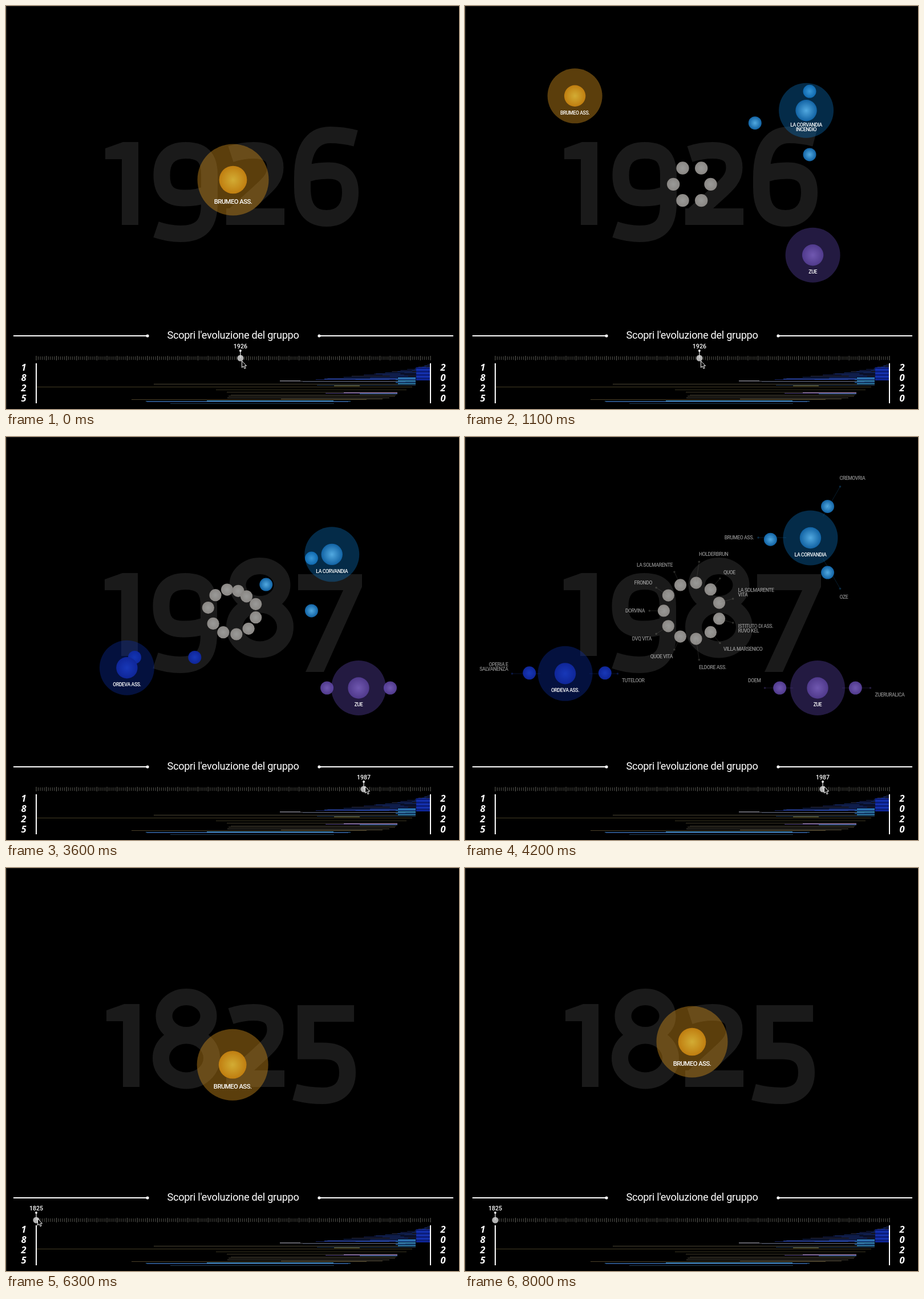
Write an HTML page that moves like this. It is 794 by 705 pixels and loops after 8100 ms.

```html
<!DOCTYPE html>
<html lang="it">
<head>
<meta charset="utf-8">
<title>Evoluzione del gruppo</title>
<style>
html, body { margin: 0; width: 100%; height: 100%; overflow: hidden; background: #000; }
svg { display: block; width: 794px; height: 705px; }
text { font-family: Roboto, "Liberation Sans", sans-serif; fill: #fff; }
.title { font-size: 18.2px; font-weight: 400; letter-spacing: -.3px; text-anchor: middle; }
.year { font-size: 10.6px; font-weight: 500; text-anchor: middle; }
.end { font: italic 700 16.5px "Open Sans", Lato, sans-serif; text-anchor: middle; }
.label { font-weight: 500; letter-spacing: -.05em; }
.big path { fill: none; stroke: #1a1a1a; stroke-width: 29; }
.big .solid { fill: #1a1a1a; stroke: none; }
</style>
</head>
<body>
<svg id="stage" viewBox="0 0 794 705"></svg>
<script>
const NS = 'http://www.w3.org/2000/svg';
const stage = document.getElementById('stage');

function add(parent, tag, attrs = {}, text) {
  const el = document.createElementNS(NS, tag);
  for (const k in attrs) el.setAttribute(k, attrs[k]);
  if (text !== undefined) el.textContent = text;
  parent.append(el);
  return el;
}
const rect = (p, x, y, width, height, fill) => add(p, 'rect', { x, y, width, height, fill });
const clamp = v => Math.max(0, Math.min(1, v));
const mix = (a, b, k) => a + (b - a) * k;
const mixPoint = (a, b, k) => [mix(a[0], b[0], k), mix(a[1], b[1], k)];
const place = (el, [x, y]) => el.setAttribute('transform', `translate(${x.toFixed(2)} ${y.toFixed(2)})`);
const show = (el, on) => { el.style.display = on ? '' : 'none'; };

// Colours: centre, edge, halo, link
const COLORS = {
  gold: ['#d2ac34', '#c07e10', '#c98a1c', '#a87818'],
  sky: ['#52a9e0', '#1263a4', '#0c74c4', '#1a6fae'],
  violet: ['#7058b0', '#503a8c', '#6048b0', '#604aa0'],
  navy: ['#1838b8', '#0f2698', '#0c30a8', '#1c3cb0'],
  grey: ['#9a9a98', '#8a8784', '#888', '#77776f']
};
const defs = add(stage, 'defs');
for (const name in COLORS) {
  const g = add(defs, 'radialGradient', { id: name });
  add(g, 'stop', { offset: 0, 'stop-color': COLORS[name][0] });
  add(g, 'stop', { offset: 1, 'stop-color': COLORS[name][1] });
}

// Backdrop numerals, drawn at their place in the row
const ONE = ['M174 249L205 238H232V383H203V268H174Z', 1];
const TWO = ['M394 259Q414 252.5 434 252.5C464 252.5 472 266 472 283C472 301 461 311 441 329L399 367M386 368.5H488'];
const FIVE = ['M610 254.5H525.5V320H556C588 320 598.5 335 598.5 358C598.5 384 583 398.5 555 398.5Q530 398.5 506 392'];
const SIX = ['M613 231.5Q590 225.5 568 225.5C534 225.5 519.5 255 519.5 300V318C519.5 353 533 371.5 562 371.5C590 371.5 603.5 353 603.5 326C603.5 301 592 288 565 288C546 288 531 291 519.5 297'];
const SEVEN = ['M512 240H624V262L557 411H525L591 268H512Z', 1];
const EIGHT = ['M277 259a39 33.5 0 0 1 78 0a39 33.5 0 0 1 -78 0ZM271.5 332.5a44.5 39.5 0 0 1 89 0a44.5 39.5 0 0 1 -89 0Z'];
const NINE = ['M263 391Q285 398.5 306 398.5C344 398.5 356.5 380 356.5 345V296C356.5 266 345 252.5 315 252.5C285 252.5 273 270 273 296C273 325 286 336 312 336C330 336 345 333 356.5 327'];
const ROWS = {
  1825: [[ONE, 2], [EIGHT, 0], [TWO, 0], [FIVE, 0]],
  1926: [[ONE, 0], [NINE, 0], [TWO, 0], [SIX, 0]],
  1987: [[ONE, -1], [NINE, -1], [EIGHT, 129], [SEVEN, 0]]
};
const numerals = {};
for (const year in ROWS) {
  const g = numerals[year] = add(stage, 'g', { class: 'big' });
  for (const [[d, solid], dx] of ROWS[year])
    add(g, 'path', { d, transform: `translate(${dx} 0)`, class: solid ? 'solid' : '' });
}

// Satellites: angle, lines, label x, label y, anchor, link length, starting point
const CENTRE = [397, 352.5], REST = [398, 304];
const ring = i => 180 + i * 360 / 11;
const gold = (r, x, y, from) => ({ c: 'gold', r, x, y, from, name: ['BRUMEO ASS.'], sats: [] });
const SCENES = [
  { at: 0, start: -9, year: 1926, hubs: [gold(62.5, ...REST)] },
  { at: .626, start: .626, year: 1926, hubs: [
    { c: 'grey', x: 398, y: 304, d: 34.3, dot: 11.2, sats: [
      [180, ['GELVIA ASS.'], 331, 304, 'end', 25],
      [-120, ['DORVINA'], 365, 229, 'end', 36],
      [-60, ['FRONDO'], 432, 229, 'start', 36],
      [0, ['LA SOLMARENTE'], 466, 304, 'start', 25],
      [60, ['TRUSK', 'PENINSULARE'], 432, 379, 'start', 36],
      [120, ['QUOE'], 365, 379, 'end', 36]] },
    gold(48, 184.5, 151.5, REST),
    { c: 'sky', r: 48, x: 606, y: 176, d: 67, dot: 11.5, name: ['LA CORVANDIA', 'INCENDIO'], sats: [
      [180, ['LA CORVANDIA', 'VITA'], 506, 171.5, 'end', 25],
      [-60, ['LA TOVRE', 'GRANDINE'], 656.5, 64, 'start', 36],
      [60, ['LA CORVANDIA', 'INFORTUNI'], 656.5, 279.5, 'start', 36]] },
    { c: 'violet', r: 48, x: 618, y: 439, name: ['ZUE'], sats: [] }] },
  { at: 3.34, start: 3.34, year: 1987, hubs: [
    { c: 'grey', x: 398, y: 304, d: 49.7, dot: 10.6, kept: true, sats: [
      [ring(0), ['DORVINA'], 315, 304, 'end', 25, [381.5, 274.5]],
      [ring(1), ['FRONDO'], 328, 255, 'end', 25, [415.5, 274.5]],
      [ring(2), ['LA SOLMARENTE'], 364, 224, 'end', 25, [433, 304]],
      [ring(3), ['HOLDERBRUN'], 410, 205, 'start', 37, [415.5, 334]],
      [ring(4), ['QUOE'], 453, 237, 'start', 25, [381.5, 334]],
      [ring(5), ['LA SOLMARENTE', 'VITA'], 478.5, 268, 'start', 25],
      [ring(6), ['ISTITUTO DI ASS.', 'RUVO KEL'], 478.5, 331, 'start', 25],
      [ring(7), ['VILLA MARSENICO'], 453, 371, 'start', 25],
      [ring(8), ['ELDORE ASS.'], 410, 403, 'start', 37],
      [ring(9), ['QUOE VITA'], 364, 384, 'end', 25],
      [ring(10), ['DVQ VITA'], 327, 353, 'end', 25]] },
    { c: 'navy', r: 48, x: 175, y: 414, d: 66.5, dot: 11.5, name: ['ORDEVA ASS.'], sats: [
      [180, ['OPERIA E', 'SALVANENZA'], 75.5, 398, 'end', 26],
      [0, ['TUTELOOR'], 275, 426, 'start', 26]] },
    { c: 'sky', r: 48, x: 606, y: 176, d: 67, dot: 11.5, name: ['LA CORVANDIA'], sats: [
      [180, ['BRUMEO ASS.'], 506, 176, 'end', 25],
      [-60, ['CREMOVRIA'], 656.5, 72, 'start', 36],
      [60, ['OZE'], 656.5, 279.5, 'start', 36]] },
    { c: 'violet', r: 48, x: 618, y: 439, d: 66.5, dot: 11.5, kept: true, name: ['ZUE'], sats: [
      [180, ['DOEM'], 518.5, 426, 'end', 26],
      [0, ['ZUERURALICA'], 718.5, 450.5, 'start', 26]] }] },
  { at: 6.273, start: 6.273, year: 1825, hubs: [gold(62.5, ...REST)] }
];

function lines(parent, list, x, y, anchor, scale = 1) {
  list.forEach((s, i) => add(parent, 'text', {
    class: 'label', x, y: y + 3.1 * scale + i * 8.1, 'text-anchor': anchor,
    style: `font-size:${8.7 * scale}px`
  }, s));
}

for (const scene of SCENES) {
  scene.g = add(stage, 'g');
  const back = add(scene.g, 'g');
  scene.late = add(scene.g, 'g');
  const front = add(scene.g, 'g');
  for (const hub of scene.hubs) {
    hub.sats = hub.sats.map(([deg, text, x, y, anchor, len, from]) => {
      const a = deg * Math.PI / 180, ux = Math.cos(a), uy = Math.sin(a);
      const el = add(back, 'circle', { r: hub.dot, fill: `url(#${hub.c})` });
      const at = d => [hub.x + ux * d, hub.y + uy * d];
      const [x1, y1] = at(hub.r ? 43 : hub.d), [x2, y2] = at(hub.d + len);
      const link = COLORS[hub.c][3];
      add(scene.late, 'line', { x1, y1, x2, y2, stroke: link, 'stroke-opacity': .5 });
      add(scene.late, 'circle', { cx: x2, cy: y2, r: 1.8, fill: link, 'fill-opacity': .7 });
      lines(scene.late, text, x, y, anchor);
      return { el, from, dx: ux * hub.d, dy: uy * hub.d };
    });
    if (!hub.r) continue;
    const k = hub.r / 48;
    hub.el = add(front, 'g');
    add(hub.el, 'circle', {
      r: hub.r, fill: COLORS[hub.c][2], 'fill-opacity': hub.c === 'gold' ? .45 : .37
    });
    add(hub.el, 'circle', { r: 18.7 * k, fill: `url(#${hub.c})` });
    lines(hub.el, hub.name, 0, 29.3 * k - (hub.name.length - 1) * 4, 'middle', k);
  }
}

// Frame, title and ruler
const SPAN = 691 / 195, yearX = y => 53 + (y - 1825) * SPAN;
rect(stage, 0, 0, 794, 1, '#1c1c1c');
rect(stage, 0, 0, 1.5, 705, '#22221e');
add(stage, 'text', { class: 'title', x: 398, y: 582 }, "Scopri l'evoluzione del gruppo");
for (const [x, dot] of [[13, 248], [549, 549]]) {
  rect(stage, x, 576, 235, 2, '#fff');
  add(stage, 'circle', { cx: dot, cy: 577, r: 2.6, fill: '#fff' });
}
for (let y = 1825; y <= 2020; y++) {
  const tall = y % 5 === 0;
  rect(stage, yearX(y) - .5, tall ? 612 : 613, 1, tall ? 8 : 6, tall ? '#66665f' : '#55554f');
}

// History chart: stepped blue rows above, long sparse rows below
const chart = add(stage, 'g');
let seed = 7;
const rand = () => (seed = seed * 16807 % 2147483647) / 2147483647;
for (let i = 0; i < 14; i++) {
  const y = 627 + i * 2, k = i / 13;
  const x = 738 - 190 * Math.pow(k, 1.6) - rand() * 8;
  rect(chart, x, y, 744 - x, 1, ['#121c48', '#16225e', '#2a2c44', '#12296a'][i % 4]);
  const bx = x + (744 - x) * rand() * .6;
  rect(chart, bx, y, (744 - bx) * .45, 1, '#1e3a94');
}
const ROWS_LOW = [
  [656, 480, 718, '#50505a'], [657.5, 520, 700, '#2c3444'], [661, 259, 690, '#4a4432'],
  [663.5, 545, 718, '#28405c'], [666, 53, 712, '#443c24'], [671, 368, 702, '#38341f'],
  [675.5, 387, 686, '#403a28'], [677.5, 560, 686, '#5a4a86'], [680, 394, 684, '#383428'],
  [682.5, 390, 682, '#4c4638'], [685.5, 388, 672, '#4a463c'], [687, 482, 660, '#544c38'],
  [688.5, 220, 632, '#4a4028'], [691, 245, 604, '#2d6a9c'], [692.5, 247, 600, '#28386c'],
  [695, 288, 575, '#203c58']
];
for (const [y, x, end, fill] of ROWS_LOW) rect(chart, x, Math.floor(y), end - x, 1, fill);
rect(chart, 575, 664, 45, 1, '#877c36');
rect(chart, 592, 676, 94, 1, '#8468a0');
rect(chart, 620, 678, 66, 1, '#3c78a8');
rect(chart, 352, 690, 222, 2, '#3f88b8');
rect(chart, 480, 655, 36, 1, '#74747a');
rect(chart, 558, 652, 160, 1, '#2c4cac');
rect(chart, 719, 632, 25, 23, '#0e2494');
for (let i = 0; i < 7; i++) rect(chart, 719, 633 + i * 3, 25, 1, i % 2 ? '#1c40c8' : '#0a1860');
for (let i = 0; i < 5; i++) rect(chart, 687 - i % 2 * 4, 650 + i * 2.5, 31 + i % 2 * 4, 1.8, i % 2 ? '#1c5898' : '#348cc0');

rect(stage, 52, 625, 2, 70, '#fff');
rect(stage, 743, 625, 2, 70, '#fff');
[[31, '1825'], [766, '2020']].forEach(([x, s]) =>
  [...s].forEach((ch, i) => add(stage, 'text', { class: 'end', x, y: 638 + i * 17.9 }, ch)));

const handle = add(stage, 'g');
add(handle, 'circle', { cy: 616, r: 5.6, fill: '#b4b4b4' });
rect(handle, -.6, 603, 1.2, 13, '#ddd');
add(handle, 'circle', { cy: 603, r: 1.9, fill: '#fff' });
const handleYear = add(handle, 'text', { class: 'year', y: 598.8 });

const cursor = add(stage, 'path', {
  d: 'M0 0V11.5L2.7 9.1L4.6 13.4L6.6 12.5L4.7 8.4H8Z', fill: '#000', stroke: '#fff'
});
const PATH = [[0, 413.5, 621], [1.5, 413.5, 621], [2.2, 629.5, 611.5], [4.6, 629.5, 611.5],
  [5.1, 11, 612], [5.3, 61.5, 611.5], [5.7, 61.5, 611.5], [6.1, 55.5, 613.5], [7, 55.5, 613.5]];

function moveCursor(t) {
  const i = PATH.findIndex(p => p[0] > t);
  show(cursor, i > 0);
  if (i < 1) return;
  const [t0, ...a] = PATH[i - 1], [t1, ...b] = PATH[i];
  const k = (t - t0) / (t1 - t0);
  place(cursor, mixPoint(a, b, k * k * (3 - 2 * k)));
}

// Hubs chase their place; satellites chase their hub
const RATE = 6.9;
function moveScene(scene, t) {
  const age = Math.max(0, t - scene.start);
  const left = Math.exp(-RATE * age);
  const lag = 1 - (1 + RATE * age) * left;
  for (const hub of scene.hubs) {
    const home = [hub.x, hub.y];
    if (hub.el) place(hub.el, hub.kept ? home : mixPoint(hub.from || CENTRE, home, 1 - left));
    const [cx, cy] = hub.kept ? home : mixPoint(CENTRE, home, lag);
    const spread = clamp(1 - left * (hub.kept ? 1 : 1.25));
    for (const s of hub.sats)
      place(s.el, s.from
        ? mixPoint(s.from, [hub.x + s.dx, hub.y + s.dy], clamp(1 - 1.1 * left))
        : [cx + s.dx * spread, cy + s.dy * spread]);
  }
  scene.late.setAttribute('opacity', clamp((age - .7) / .3));
}

const LOOP = 8100, STEP = 100;
const begin = performance.now();
function draw() {
  const ms = (performance.now() - begin) % LOOP;
  const t = Math.floor(ms / STEP) * STEP / 1000;
  const scene = SCENES.filter(s => s.at <= t).pop();
  for (const s of SCENES) show(s.g, s === scene);
  for (const year in numerals) show(numerals[year], +year === scene.year);
  moveScene(scene, t);
  place(handle, [yearX(scene.year), 0]);
  handleYear.textContent = scene.year;
  moveCursor(t);
  requestAnimationFrame(draw);
}
draw();
</script>
</body>
</html>
```
